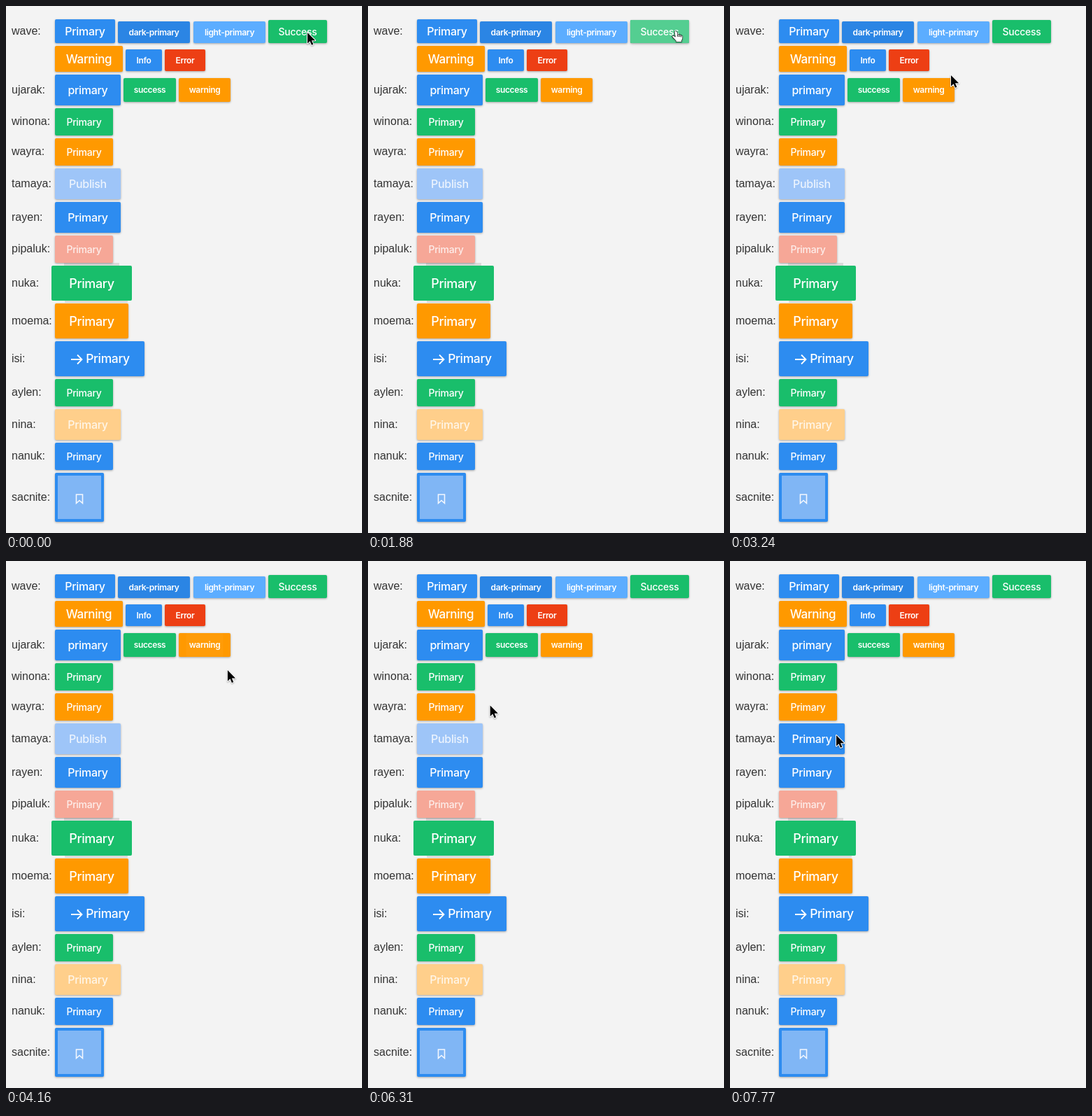
Write an HTML page with a canvas that moves like this. It is 509x753 px and loops after 8 s.

```html
<!DOCTYPE html>
<html lang="en">
<head>
<meta charset="utf-8">
<title>Button effects</title>
<style>
  html, body { margin: 0; width: 100%; height: 100%; overflow: hidden; background: #f3f3f3; }
  canvas { display: block; width: 509px; height: 753px; }
</style>
</head>
<body>
<canvas id="stage"></canvas>
<script>
const W = 509, H = 753, LOOP = 8000;
const BLUE = '#2d8cf0', DARK = '#2b85e4', LIGHT = '#5cadff';
const GREEN = '#19be6b', ORANGE = '#ff9900', RED = '#ed3f14';
const PALE_BLUE = '#9ec5f8', PALE_ORANGE = '#ffcf8b', PALE_RED = '#f6a797';
const SOFT = 'rgba(255,255,255,.8)';

const canvas = document.getElementById('stage');
const dpr = window.devicePixelRatio || 1;
canvas.width = W * dpr;
canvas.height = H * dpr;
const ctx = canvas.getContext('2d');

// Row label and the vertical centre of its row
const labels = [
  ['wave', 36], ['ujarak', 120], ['winona', 165.5], ['wayra', 208.5], ['tamaya', 254],
  ['rayen', 302], ['pipaluk', 347.5], ['nuka', 396], ['moema', 450], ['isi', 504],
  ['aylen', 552.5], ['nina', 598], ['nanuk', 643.5], ['sacnite', 702]
];

// Pointer path: time, x, y
const path = [
  [0, 431, 38], [140, 431, 38], [230, 420, 37], [700, 420, 37], [940, 440, 36],
  [2110, 440, 36], [2420, 385, 66], [2900, 328, 69], [2930, 328, 69], [3240, 316, 99],
  [3660, 300, 122], [3930, 300, 122], [4160, 317, 156], [4710, 204, 206], [4740, 204, 206],
  [5180, 130, 159], [5690, 130, 159], [5950, 206, 190], [6150, 203, 203], [6470, 141, 208],
  [6560, 122, 208], [6850, 122, 208], [6990, 174, 220], [7200, 216, 238], [7650, 152, 249],
  [8000, 152, 249]
];

const clamp = v => Math.max(0, Math.min(1, v));
const mix = (a, b, k) => a + (b - a) * k;

// cubic-bezier(.2, 1, .3, 1)
function ease(x) {
  if (x <= 0 || x >= 1) return clamp(x);
  let lo = 0, hi = 1;
  for (let i = 0; i < 24; i++) {
    const s = (lo + hi) / 2, r = 1 - s;
    if (3 * r * r * s * .2 + 3 * r * s * s * .3 + s * s * s < x) lo = s; else hi = s;
  }
  return 1 - (1 - lo) ** 3;
}

// Hover amount: rises from `enter`, falls from `leave`
const hover = (t, enter, leave, dur) =>
  t < leave ? ease((t - enter) / dur) : 1 - ease((t - leave) / dur);

function pointerAt(t) {
  let i = 0;
  while (i < path.length - 2 && t >= path[i + 1][0]) i++;
  const same = (a, b) => a[1] === b[1] && a[2] === b[2];
  const slope = (j, c) => {
    const a = path[j - 1], p = path[j], b = path[j + 1];
    if (!a || !b || same(a, p) || same(p, b)) return 0;
    return (b[c] - a[c]) / (b[0] - a[0]);
  };
  const p = path[i], q = path[i + 1], d = q[0] - p[0], u = clamp((t - p[0]) / d);
  return [1, 2].map(c => {
    const k = u * u * (3 - 2 * u);
    return mix(p[c], q[c], k) + d * u * (1 - u) * ((1 - u) * slope(i, c) - u * slope(i + 1, c));
  });
}

function box(x, y, w, h, color, r = 2) {
  ctx.beginPath();
  ctx.roundRect(x, y, w, h, r);
  ctx.fillStyle = color;
  ctx.fill();
}

function shadow(color, dy, blur) {
  ctx.shadowColor = color;
  ctx.shadowOffsetY = dy * dpr;
  ctx.shadowBlur = blur * dpr;
}

function raised(x, y, w, h, color) {
  ctx.save();
  shadow('rgba(0,0,0,.32)', 1, 3);
  box(x, y, w, h, color);
  ctx.restore();
}

function caption(text, cx, cy, size, color = '#fff') {
  ctx.font = `${size < 14 ? 600 : 500} ${size}px Inter, sans-serif`;
  ctx.letterSpacing = `${size * (size < 14 ? -.03 : -.02)}px`;
  ctx.textAlign = 'center';
  ctx.fillStyle = color;
  ctx.fillText(text, cx, Math.round(cy + size * .364));
  ctx.letterSpacing = '0px';
}

function button(text, x, y, w, h, color, size, ink) {
  raised(x, y, w, h, color);
  caption(text, x + w / 2, y + h / 2, size, ink);
}

// Draws inside the rounded face of a button
function inside(x, y, w, h, draw) {
  ctx.save();
  ctx.beginPath();
  ctx.roundRect(x, y, w, h, 2);
  ctx.clip();
  draw();
  ctx.restore();
}

function drawLabels() {
  ctx.font = '16px "Liberation Sans", Arial, sans-serif';
  ctx.textAlign = 'left';
  ctx.fillStyle = '#333';
  for (const [name, y] of labels) ctx.fillText(name + ':', 8, Math.floor(y + 5));
}

function drawSuccess(t) {
  const x = 375, y = 20, w = 84, h = 33;
  const lit = t < 2230 ? clamp((t - 700) / 200) : 1 - clamp((t - 2230) / 200);
  const lift = clamp((t - 1090) / 30) * (1 - clamp((t - 1300) / 700));
  if (lift > 0) {
    ctx.save();
    shadow(`rgba(0,0,0,${.2 * lift})`, 3, 6);
    box(x, y, w, h, GREEN);
    ctx.restore();
  }
  raised(x, y, w, h, GREEN);
  box(x, y, w, h, `rgba(255,255,255,${.22 * lit})`);
  const grow = clamp((t - 1290) / 500), fade = 1 - clamp((t - 1500) / 500);
  if (grow > 0 && fade > 0) inside(x, y, w, h, () => {
    ctx.beginPath();
    ctx.arc(440, 37, 75 * (1 - (1 - grow) ** 2), 0, 7);
    ctx.fillStyle = `rgba(255,255,255,${.2 * fade})`;
    ctx.fill();
  });
  caption('Success', x + w / 2, y + h / 2 + .5, 14);
}

function drawUjarak(t) {
  const x = 247, y = 103, w = 74, h = 34;
  const k = hover(t, 3280, 3995, 400);
  raised(x, y, w, h, ORANGE);
  if (k > 0) {
    const sw = w * mix(.7, 1, k);
    ctx.globalAlpha = k;
    box(x + (w - sw) / 2, y, sw, h, PALE_ORANGE);
    ctx.globalAlpha = 1;
  }
  caption('warning', x + w / 2, y + h / 2, 12);
}

function drawWinona(t) {
  const x = 70, y = 146, w = 83, h = 39;
  const k = hover(t, 4960, 5780, 300);
  raised(x, y, w, h, GREEN);
  inside(x, y, w, h, () => {
    ctx.globalAlpha = 1 - k;
    caption('Primary', x + w / 2, y + h / 2 - k * h / 4, 14);
    ctx.globalAlpha = k;
    caption('Publish', x + w / 2, y + h / 2 + (1 - k) * h / 4, 14);
  });
}

function drawWayra(t) {
  const x = 70, y = 189, w = 83, h = 39;
  const k = 1 - hover(t, 6390, 6957, 300);
  raised(x, y, w, h, ORANGE);
  if (k < 1) inside(x, y, w, h, () => {
    ctx.translate(x, y + h);
    ctx.rotate(-Math.PI / 4 * k);
    ctx.fillStyle = PALE_ORANGE;
    ctx.fillRect(0, -h - 31 * k, w * 1.5, h);
  });
  caption('Primary', x + w / 2, y + h / 2, 14);
}

function drawTamaya(t) {
  const x = 70, y = 232, w = 94, h = 44, cx = x + w / 2, cy = y + h / 2;
  const k = hover(t, 7570, LOOP, 300);
  if (k === 0) {
    button('Publish', x, y, w, h, PALE_BLUE, 16, SOFT);
    return;
  }
  raised(x, y, w, h, BLUE);
  ctx.save();
  ctx.globalAlpha = k;
  ctx.translate(cx, cy);
  ctx.scale(mix(.2, 1, k), mix(.2, 1, k));
  caption('Primary', 0, 0, 16);
  ctx.restore();
  if (k < .97) inside(x, y, w, h, () => {
    for (const side of [-1, 1]) {
      ctx.save();
      ctx.translate(0, side * k * h / 2);
      ctx.beginPath();
      ctx.rect(x, side < 0 ? y : cy, w, h / 2);
      ctx.clip();
      box(x, y, w, h, PALE_BLUE, 0);
      caption('Publish', cx, cy, 16, SOFT);
      ctx.restore();
    }
  });
}

function stroke(d, color, width) {
  ctx.strokeStyle = color;
  ctx.lineWidth = width;
  ctx.stroke(new Path2D(d));
}

function drawButtons(t) {
  button('Primary', 70, 19, 86, 34, BLUE, 16);
  button('dark-primary', 160, 22, 103, 31, DARK, 12);
  button('light-primary', 268, 22, 103, 31, LIGHT, 12);
  drawSuccess(t);
  button('Warning', 70, 57, 97, 37, ORANGE, 17);
  button('Info', 171, 62, 52, 31, BLUE, 12);
  button('Error', 227, 62, 58, 31, RED, 12);

  button('primary', 70, 98, 94, 44, BLUE, 16);
  button('success', 168, 103, 75, 34, GREEN, 12);
  drawUjarak(t);
  drawWinona(t);
  drawWayra(t);
  drawTamaya(t);

  button('Primary', 70, 280, 94, 44, BLUE, 16);
  button('Primary', 70, 328, 83, 39, PALE_RED, 14, SOFT);

  box(83, 367, 79, 6, 'rgba(0,0,0,.1)', 0);
  box(84, 420, 90, 4, 'rgba(0,0,0,.1)', 1);
  box(65, 371, 115, 50, GREEN);
  caption('Primary', 122.5, 396, 18);

  button('Primary', 70, 425, 105, 50, ORANGE, 18);

  raised(70, 479, 128, 50, BLUE);
  stroke('M93 505H108M102 498.5L108.5 505L102 511.5', '#fff', 1.8);
  caption('Primary', 145.5, 504, 17.5);

  button('Primary', 70, 533, 83, 39, GREEN, 14);
  button('Primary', 70, 576, 94, 44, PALE_ORANGE, 16, SOFT);
  button('Primary', 70, 624, 83, 39, BLUE, 14);

  raised(70, 667, 70, 70, BLUE);
  box(74, 671, 62, 62, '#80b6f5', 0);
  stroke('M100.5 698H109.5V710.5L105 706.5L100.5 710.5Z', '#f2f7fe', 1.6);
}

const arrow = new Path2D('M0 0V15.6L3.6 12.2L6 17.8L8.4 16.8L6 11.3H11.2Z');
const hand = new Path2D('M-1.6 1Q0 -1 1.6 1L2.6 5Q4 4 5 5.4Q6.5 4.6 7.4 6.2Q9 5.6 9.5 7.6' +
  'Q10 11 8.2 13V15H.6V13.4Q-3 10.5 -5 7.6Q-4.4 5.4 -2 7.4L-.2 8.4Z');

function drawPointer(t) {
  const [x, y] = pointerAt(t);
  const isHand = t >= 700 && t < 2230;
  ctx.save();
  ctx.translate(x, y);
  ctx.lineJoin = 'round';
  ctx.lineWidth = isHand ? 1.2 : 2;
  ctx.strokeStyle = isHand ? '#000' : '#fff';
  ctx.fillStyle = isHand ? '#fff' : '#000';
  ctx.save();
  shadow('rgba(0,0,0,.3)', 1, 2);
  ctx.stroke(isHand ? hand : arrow);
  ctx.restore();
  ctx.fill(isHand ? hand : arrow);
  if (isHand) stroke('M2.6 5L3.2 8M5 5.4L5.4 8M7.4 6.2L7.5 8.4', '#000', 1);
  ctx.restore();
}

const start = performance.now();

function frame() {
  const t = (performance.now() - start) % LOOP;
  ctx.setTransform(dpr, 0, 0, dpr, 0, 0);
  ctx.fillStyle = '#f3f3f3';
  ctx.fillRect(0, 0, W, H);
  drawLabels();
  drawButtons(t);
  drawPointer(t);
  requestAnimationFrame(frame);
}
frame();
</script>
</body>
</html>
```
